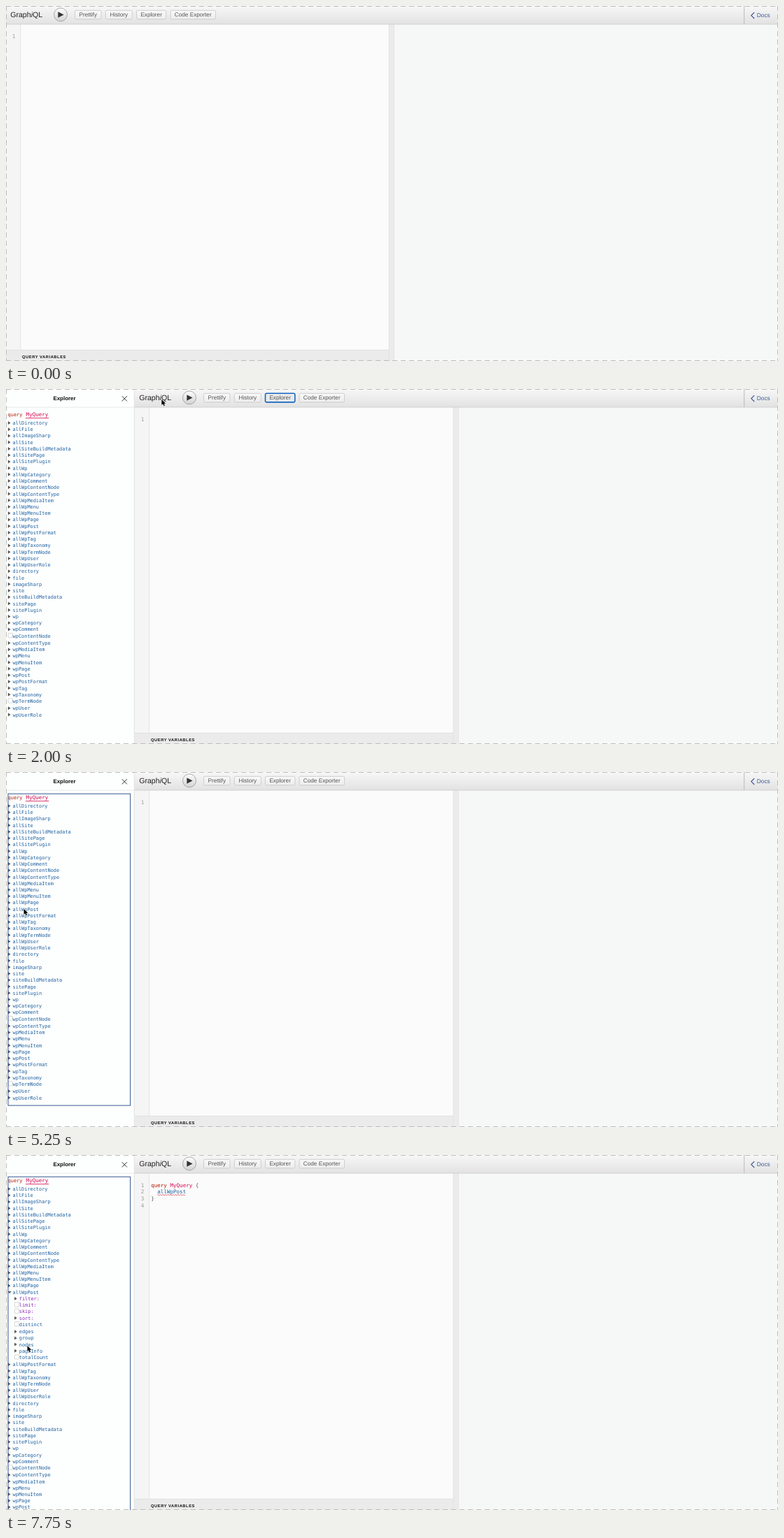
Animation, 1103 px wide and 508 px high, one loop 8 s. Source, as an HTML page:

```html
<!DOCTYPE html>
<html lang="en">
<head>
<meta charset="utf-8">
<title>GraphiQL explorer</title>
<style>
  html, body { margin: 0; width: 100%; height: 100%; overflow: hidden; background: #fff; }
  svg { display: block; width: 100%; height: 100%; }
  text { font-family: "Liberation Sans", Arial, sans-serif; text-rendering: geometricPrecision; white-space: pre; }
  .mono { font-family: "DejaVu Sans Mono", monospace; }
</style>
</head>
<body>
<svg id="stage" viewBox="0 0 1103 508" preserveAspectRatio="none"></svg>
<script>
const stage = document.getElementById('stage');
const LOOP = 8000, STEP = 250;
const OPEN = 2000, FOCUS = 1750, BLUR = 5250, EXPAND = 5500, LINT = 6000;
const BLUE = '#1f61a0', RED = '#b11a04', PINK = '#d2054e', PURPLE = '#8b2bb9';
const ROW = 9.233, BOX_ROW = 10.25;

const fields = ('directory file imageSharp site siteBuildMetadata sitePage sitePlugin wp wpCategory ' +
  'wpComment wpContentNode wpContentType wpMediaItem wpMenu wpMenuItem wpPage wpPost wpPostFormat ' +
  'wpTag wpTaxonomy wpTermNode wpUser wpUserRole').split(' ');
const listed = fields.map(f => 'all' + f[0].toUpperCase() + f.slice(1)).concat(fields);
const args = 'filter: limit: skip: sort: distinct edges group nodes pageInfo totalCount'.split(' ');
const boxed = ['wpContentNode', 'wpTermNode', 'limit:', 'skip:', 'distinct', 'totalCount'];

// Pointer path: time, x, y of the tip
const path = [
  [250, 297, 99], [1250, 251, 19], [1500, 223, 15], [2250, 222, 15], [2500, 211, 17],
  [3750, 61, 55], [4000, 45, 70], [5000, 25.5, 196], [5750, 25.5, 196],
  [7000, 29, 252], [7750, 30.5, 273]
];

const rect = (x, y, w, h, fill, more = '') =>
  `<rect x="${x}" y="${y}" width="${w}" height="${h}" fill="${fill}" ${more}/>`;
const line = (d, stroke, w = 1, more = '') =>
  `<path d="${d}" fill="none" stroke="${stroke}" stroke-width="${w}" ${more}/>`;
const text = (x, y, s, size, fill, more = '') =>
  `<text x="${x}" y="${y}" font-size="${size}" fill="${fill}" ${more}>${s}</text>`;
const mono = (x, y, s, size, fill, more = '') => text(x, y, s, size, fill, 'class="mono" ' + more);

const defs = `<defs>
  <linearGradient id="bar" x2="0" y2="1"><stop stop-color="#f7f7f7"/><stop offset="1" stop-color="#e2e2e2"/></linearGradient>
  <linearGradient id="btn" x2="0" y2="1"><stop stop-color="#f9f9f9"/><stop offset="1" stop-color="#ececec"/></linearGradient>
  <linearGradient id="play" x2="0" y2="1"><stop stop-color="#fdfdfd"/><stop offset="1" stop-color="#d2d3d6"/></linearGradient>
</defs>`;

function button(x, w, label, focused) {
  const border = focused ? 'stroke="#1766c2" stroke-width="1.6"' : 'stroke="#c6c6c6" stroke-width=".8"';
  return rect(x, 6.3, w, 12.6, focused ? '#e9eaeb' : 'url(#btn)', 'rx="1.6" ' + border) +
    text(x + w / 2, 15.4, label, 8.2, '#555', 'text-anchor="middle"');
}

function toolbar(left, focused) {
  return rect(left, 0, 1103 - left, 26, 'url(#bar)') +
    line(`M${left} 26H1103`, '#d0d0d0') +
    `<g transform="translate(${left})">` +
    text(6.2, 16.4, 'Graph<tspan font-style="italic">i</tspan>QL', 10.6, '#222') +
    '<circle cx="78" cy="12.4" r="9.5" fill="url(#play)" stroke="#8c8c8c" stroke-width=".7"/>' +
    '<path d="M74.4 8.3L82.6 12.5L74.4 16.7Z" fill="#333"/>' +
    button(98.5, 37.5, 'Prettify') + button(142.3, 38, 'History') +
    button(186.5, 42.3, 'Explorer', focused) + button(235, 64.5, 'Code Exporter') + '</g>' +
    line('M1054.7 0V26', '#bbb') +
    line('M1069.2 9.2L1064.8 13.6L1069.2 18', '#3b5998', 1.2) +
    text(1072.8, 16.4, 'Docs', 8.3, '#3b5998');
}

function panes(left, split, t) {
  const x = left + 23.2;
  const code = (row, s, fill, dx = 0) => mono(x + dx, 45.6 + row * 9.75, s, 7.56, fill);
  const filled = t >= EXPAND;
  let out = rect(left, 26, split - left, 466, '#fbfbfb') +
    rect(left, 26, 20.5, 466, '#f5f5f5') + line(`M${left + 20.7} 26V492`, '#dedede', .8) +
    rect(left, 492, split - left, 16, '#ebebeb') + line(`M${left} 492.3H${split}`, '#dcdcdc', .7) +
    text(x - .2, 503.5, 'QUERY VARIABLES', 5.75, '#111', 'font-weight="bold" letter-spacing=".56"') +
    rect(split, 26, 8, 482, '#ebebeb') +
    line(`M${split + .2} 26V508M${split + 8} 26V508`, '#dedede', .7) +
    rect(split + 8, 26, 1095 - split, 482, '#f6f7f7');
  for (let n = 0; n < (filled ? 4 : 1); n++)
    out += mono(left + 13.4, 45.6 + n * 9.75, n + 1, 7.56, '#999', 'text-anchor="end"');
  if (filled) {
    out += code(0, `<tspan fill="${RED}">query</tspan> <tspan fill="${PINK}">MyQuery</tspan> {`, '#555') +
      code(1, 'allWpPost', BLUE, 9.1) + code(2, '}', '#555');
    if (t >= LINT) {
      const wave = `M${x + 9} 57.2` + 'q.9 -1.4 1.8 0t1.8 0'.repeat(11);
      out += line(wave, '#d8283a', .7);
    }
  }
  return out;
}

function row(x, y, name, fill, open) {
  let mark;
  if (boxed.includes(name))
    mark = rect(x - 6.4, y - 3.8, 6.2, 6.2, '#fff', 'stroke="#c4c4c4" stroke-width=".7" rx=".5"');
  else
    mark = `<path d="${open ? `M${x - 7} ${y - 1.4}h5l-2.5 3.4Z` : `M${x - 6.7} ${y - 2.6}v5l3.6 -2.5Z`}" fill="#555"/>`;
  return mark + mono(x, y + 2.4, name, 6.92, fill);
}

function explorer(t) {
  let out = rect(0, 0, 183.5, 508, '#fdfefe') + line('M0 26.2H183', '#e4e4e4', .8) +
    line('M183.3 0V508', '#d8d8d8', .8) +
    text(83.5, 16.3, 'Explorer', 7.95, '#111', 'font-weight="bold" text-anchor="middle"') +
    line('M165.7 10.2L172.9 17.4M172.9 10.2L165.7 17.4', '#333', 1) +
    mono(2.6, 39.3, 'query', 6.92, RED) + mono(28.6, 39.3, 'MyQuery', 7.56, PINK) +
    line('M28 41.6H61.2', PINK, .8);
  let y = 48.6;
  const expanded = t >= EXPAND;
  for (const name of listed) {
    const open = expanded && name === 'allWpPost';
    out += row(9.6, y, name, BLUE, open);
    y += boxed.includes(name) ? BOX_ROW : ROW;
    if (!open) continue;
    for (const arg of args) {
      const isArg = arg.endsWith(':');
      out += row(18.8, y, arg, isArg ? PURPLE : BLUE);
      y += !isArg && boxed.includes(arg) ? BOX_ROW : ROW;
    }
  }
  if (t >= BLUR)
    out += rect(3, 31.2, 174.6, y - 29.4, 'none', 'stroke="#36598f" stroke-width="1"');
  return out;
}

function pointer(t) {
  if (t < path[0][0]) return '';
  let i = path.findIndex(p => p[0] > t);
  if (i < 0) i = path.length;
  const a = path[i - 1], b = path[i] || a;
  const k = b === a ? 0 : (t - a[0]) / (b[0] - a[0]);
  const x = a[1] + (b[1] - a[1]) * k, y = a[2] + (b[2] - a[2]) * k;
  return `<path transform="translate(${x} ${y})" d="M0 0V8L1.9 6.3L3.2 9.2L4.6 8.6L3.4 5.8H5.9Z" ` +
    'fill="#000" stroke="#fff" stroke-width=".7" paint-order="stroke"/>';
}

const frame = line('M0 .5H1103M0 507.5H1103M.5 0V508M1102.5 0V508', '#bcbcbc', 1, 'stroke-dasharray="7 5"');

function draw(t) {
  const open = t >= OPEN;
  const left = open ? 184 : 0, split = open ? 639 : 547;
  stage.innerHTML = defs + panes(left, split, t) +
    toolbar(left, t >= FOCUS && t < BLUR) +
    (open ? explorer(t) : '') + frame + pointer(t);
}

const start = performance.now();
let shown = -1;
function tick() {
  const t = Math.floor((performance.now() - start) % LOOP / STEP) * STEP;
  if (t !== shown) draw(shown = t);
  requestAnimationFrame(tick);
}
tick();
</script>
</body>
</html>
```
